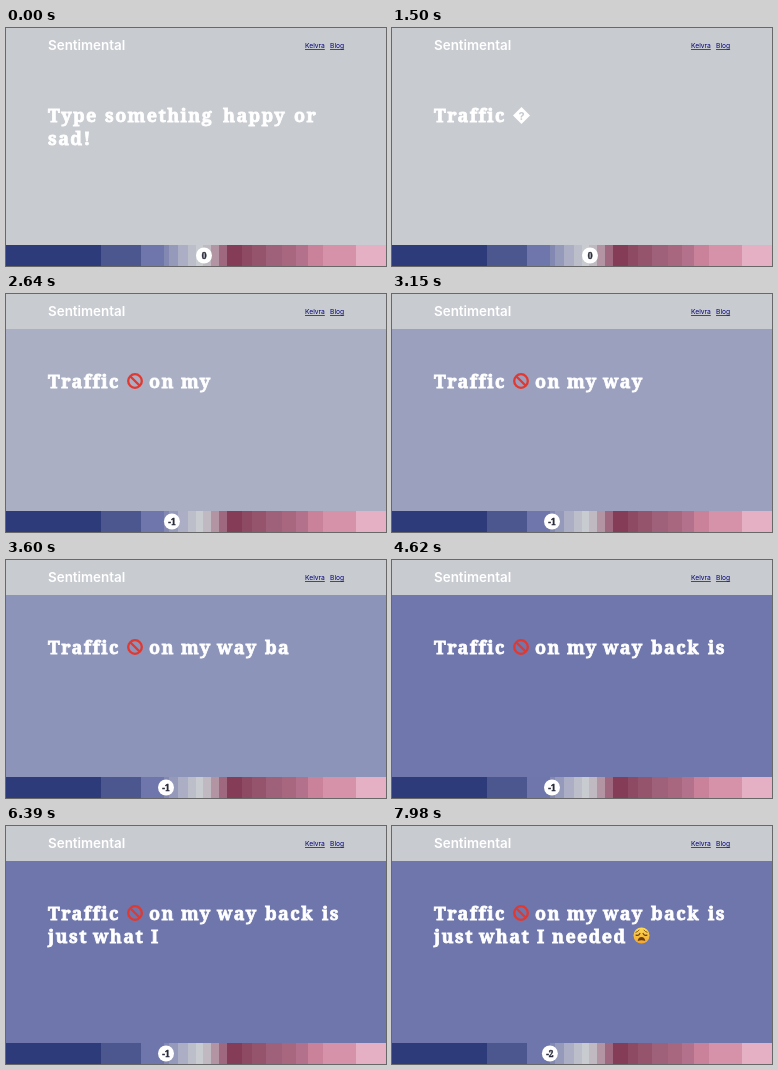
An HTML page for the animation above (8 s loop, 380 by 238 pixels).

```html
<!DOCTYPE html>
<html lang="en">
<head>
<meta charset="utf-8">
<title>Sentimental</title>
<style>
  html, body { margin: 0; width: 100%; height: 100%; overflow: hidden; background: #c8cbd0; }
  svg { display: block; width: 100vw; height: 100vh; }
  .slab { font: 700 18px "Noto Serif", serif; letter-spacing: 1.4px; fill: #fff; stroke: #fff; stroke-width: .8; }
  .title { font: 600 13.4px Inter, sans-serif; fill: #fff; }
  .link { font: 400 6.7px Inter, sans-serif; fill: #00007c; text-decoration: underline; }
  .score { font: 700 8.5px "Noto Serif", serif; fill: #2b2c3c; stroke: #2b2c3c; stroke-width: .4; text-anchor: middle; }
  .query { font: 700 11px Inter, sans-serif; text-anchor: middle; }
</style>
</head>
<body>
<svg viewBox="0 0 380 238" preserveAspectRatio="none">
  <defs>
    <linearGradient id="skin" x2="0" y2="1">
      <stop offset="0" stop-color="#ffdc55"/>
      <stop offset="1" stop-color="#f2a52f"/>
    </linearGradient>
    <g id="unknown">
      <path d="M0-8.5 8.5 0 0 8.5-8.5 0Z" fill="#fff"/>
      <text class="query" y="4" fill="#c8cbd0">?</text>
    </g>
  </defs>
  <rect width="380" height="238" fill="#c8cbd0"/>
  <rect id="panel" y="35" width="380" height="182"/>
  <text class="title" x="42" y="22">Sentimental</text>
  <text class="link" x="299" y="20">Kelvra</text>
  <text class="link" x="324" y="20">Blog</text>
  <g id="bar"></g>
  <g id="prompt"></g>
  <g id="typed"></g>
  <use id="gap1" href="#unknown" x="129.5" y="87.5"/>
  <use id="gap2" href="#unknown" x="249.5" y="110"/>
  <g id="stop" transform="translate(129 87)" fill="none" stroke="#e2382f" stroke-width="2.3">
    <circle r="6.8"/>
    <path d="M-4.8-4.8 4.8 4.8"/>
  </g>
  <g id="weary" transform="translate(249.5 109.5)" fill="none" stroke="#6b3d12" stroke-linecap="round">
    <circle r="8" fill="url(#skin)" stroke="none"/>
    <path d="M-5.6-3.2Q-3.6-3.6-2.4-5.4M5.6-3.2Q3.6-3.6 2.4-5.4" stroke-width=".8"/>
    <path d="M-5.4-.4Q-3 .6-1.6-2M5.4-.4Q3 .6 1.6-2" stroke-width="1.2"/>
    <path d="M-3.8 5.6Q-3.2 1.4 0 1.4T3.8 5.6Q0 3.8-3.8 5.6Z" fill="#6b3d12" stroke="none"/>
  </g>
  <g id="marker">
    <circle r="8" fill="#fff"/>
    <text id="score" class="score" y="3.1"></text>
  </g>
</svg>
<script>
const LOOP = 8000, FIRST = 1650, SECOND = 7620;
const LINE1 = 94.2, LINE2 = 116.7;
const $ = id => document.getElementById(id);

function add(parent, tag, attrs, text = '') {
  const el = document.createElementNS('http://www.w3.org/2000/svg', tag);
  for (const key in attrs) el.setAttribute(key, attrs[key]);
  el.textContent = text;
  return parent.appendChild(el);
}

const word = (parent, x, y, text) => add(parent, 'text', { class: 'slab', x, y }, text);

// Left edge and colour of each band of the scale
const bands = [
  [0, '#2e3b7b'], [95, '#4c5790'], [135, '#6e76ac'], [158, '#8388b2'],
  [163, '#9599ba'], [172, '#abaec4'], [182, '#bcbeca'], [190, '#c8cbd0'],
  [197, '#c0b9c1'], [205, '#b394a2'], [213, '#a0687e'], [221, '#853c57'],
  [236, '#8e4a63'], [246, '#96546c'], [260, '#9f6079'], [276, '#a9667f'],
  [290, '#b4718b'], [302, '#c98299'], [317, '#d692a9'], [350, '#e5b0c4']
];
bands.forEach(([x, fill]) => add($('bar'), 'rect', { x, y: 217, width: 380 - x, height: 21, fill }));

[[42, 'Type'], [99, 'something'], [217, 'happy'], [288, 'or']]
  .forEach(([x, s]) => word($('prompt'), x, LINE1, s));
word($('prompt'), 42, LINE2, 'sad!');

// Each word with the times of its keystrokes
const words = [
  [42, LINE1, 'Traffic', [90, 300, 510, 690, 840, 1020, 1230]],
  [143, LINE1, 'on', [1950, 2130]],
  [175, LINE1, 'my', [2400, 2580]],
  [211, LINE1, 'way', [2820, 2970, 3120]],
  [259, LINE1, 'back', [3390, 3570, 3750, 3900]],
  [316, LINE1, 'is', [4230, 4440]],
  [42, LINE2, 'just', [4890, 5040, 5190, 5340]],
  [87, LINE2, 'what', [5580, 5730, 5880, 6030]],
  [145, LINE2, 'I', [6300]],
  [160, LINE2, 'needed', [6540, 6690, 6840, 7110, 7260, 7410]]
].map(([x, y, text, keys]) => ({ el: word($('typed'), x, y, ''), text, keys }));

const clamp = u => Math.min(1, Math.max(0, u));
const cubicInOut = u => u < .5 ? 4 * u ** 3 : 1 - 4 * (1 - u) ** 3;
const glide = (t, start) => cubicInOut(clamp((t - start) / 1500));
const mix = (a, b, u) => `rgb(${a.map((v, i) => Math.round(v + (b[i] - v) * u))})`;
const show = (id, on) => $(id).setAttribute('visibility', on ? 'visible' : 'hidden');

function draw(t) {
  show('prompt', t < 90);
  for (const { el, text, keys } of words)
    el.textContent = text.slice(0, keys.filter(k => k <= t).length);

  show('gap1', t >= 1500 && t < FIRST);
  show('stop', t >= FIRST);
  show('gap2', t >= 7560 && t < SECOND);
  show('weary', t >= SECOND);

  const fade = clamp((t - FIRST) / 3000);
  const panel = mix([200, 203, 208], [110, 118, 172], fade);
  $('panel').setAttribute('fill', panel);
  document.querySelector('#unknown text').setAttribute('fill', panel);

  const x = 198 - 38 * (glide(t, FIRST) + glide(t, SECOND));
  $('marker').setAttribute('transform', `translate(${x.toFixed(2)} 227.5)`);
  $('score').textContent = t < FIRST ? '0' : t < SECOND ? '-1' : '-2';
}

const begin = performance.now();
function tick() {
  draw((performance.now() - begin) % LOOP);
  requestAnimationFrame(tick);
}
tick();
</script>
</body>
</html>
```
